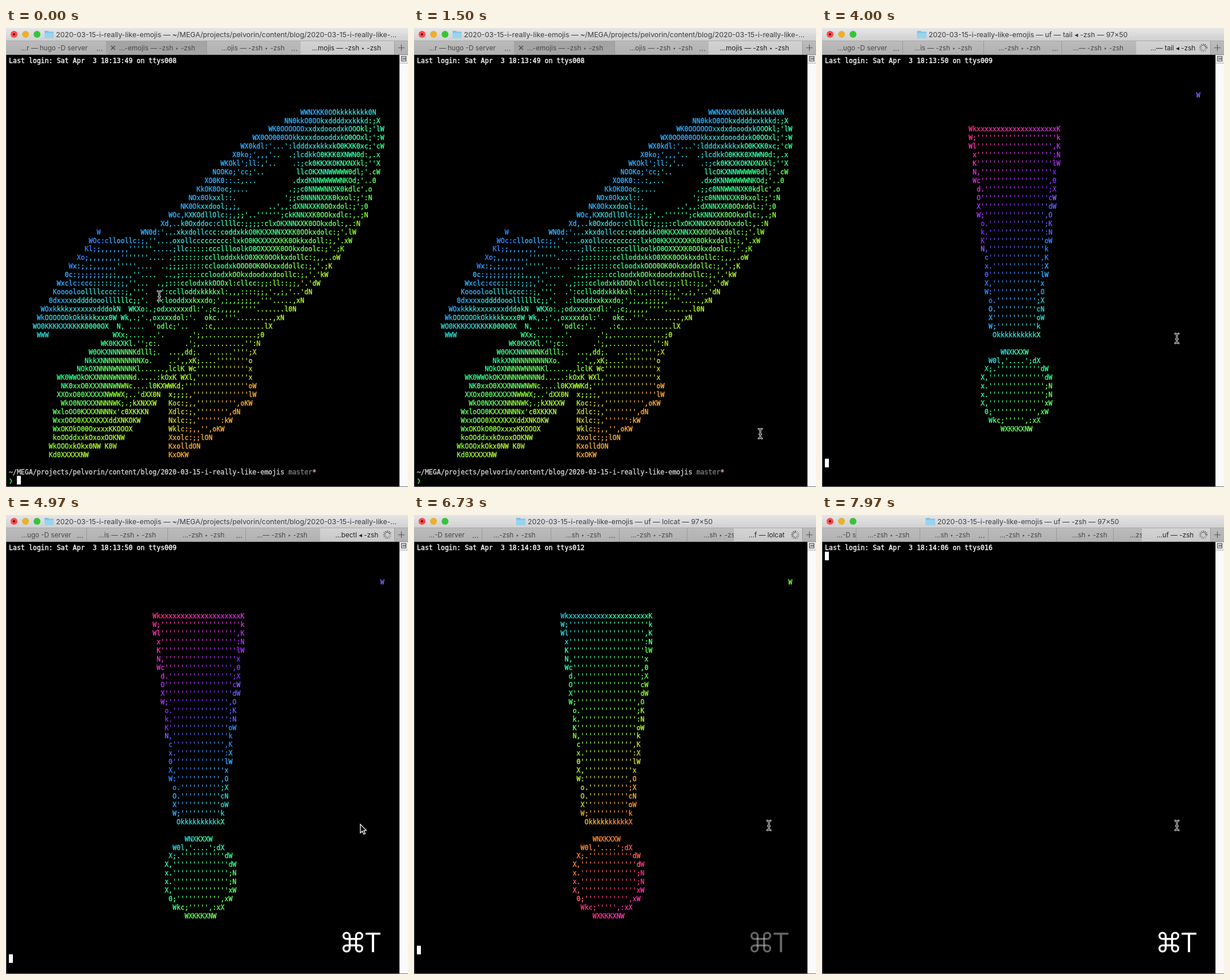
Recreate the animation shown at these times as an HTML page with a canvas. Size 700 by 800 pixels, loop 8000 ms.

```html
<!DOCTYPE html>
<html lang="en">
<head>
<meta charset="utf-8">
<title>Terminal tabs</title>
<style>
html, body { margin: 0; width: 100%; height: 100%; overflow: hidden; background: #000; }
canvas { display: block; }
</style>
</head>
<body>
<canvas id="stage" width="700" height="800"></canvas>
<script>
const LOOP = 8000, COL = 6.953, ROW = 14.93;
const MONO = '11.55px "DejaVu Sans Mono", monospace';
const UI = 'Inter, "DejaVu Sans", sans-serif';
const ctx = document.getElementById('stage').getContext('2d');

// Each art line: start column, then text; c{n} repeats c n times.
const WING = `





73 WWNXKK0OOkkkkkkkk0N
69 NN0kkO0OOkxddddxxkkkd:;X
65 WK0OOOOOOxxdxdooodxkOOOkl;'lW
61 WX0OO000OOkkxxxdoooddxkO0OOxl;':W
58 WX0kdl:'...':ldddxxkkkxkO0KXK0xc;'cW
56 X0ko;',,,'..  .;lcdkkO0KKK0XNWN0d:,.x
53 WKOkl';ll:,'..    .:;ck0KKXKOKNXNXkl;''X
51 NOOKo;'cc;'..        llcOKXNNWWWWW0dl;'.cW
49 XO0K0::.:,...         .dxdKNNWWWWWNKOd;'..0
47 KkOK0Ooc;....          .;;c0NNWWNNXK0kdlc'.o
45 NOx0Okxxl::.            ';;c0NNNNXXK0kxol:;':N
43 NK0Okxxdool;,;,       ..',,:dXNNXXK0OOxdol:;';0
40 WOc,KXKOdllOlc:;,;;'..'''''';ckKNNXXK0OOkxdlc:,.;N
38 Xd,..k0Oxddoc:cllllc:;;;;:clxOKXNNXXK0OOkxdol:,.:N
22 W          WN0d:'...xkxdollccc:coddxkkO0KKXXNNXXKK0OOkxdolc:;'.lW
20 WOc:clloollc:;,''....oxollccccccccc:lxkO0KKXXXXXKK0Okkxdoll:;,'.xW
19 Kl;;,,,,,,,''''''.....;llc:::::cccllloolkO0OXXXXK0OOkxdoolc:;'.;K
17 Xo;,,,,,,,,'''''''.... .;:::::::cclloddxkkO0XKK0OOkkxdollc:;,,..oW
15 Wx:;,;,,,,,,'''''....  ..;;;;:::::ccloodxkOOO0OK0Okxxddollc:;,'.;K
14 0c:;;;;;;;;;;,,,,''....  ..,;:::::ccloodxkOOkxdoodxxdoollc:;,'.'kW
12 Wxclc:ccc:::::;;;,''...  .,;:::cclodxkkOOOxl:cllcc:;;:ll::;;,'.'dW
11 Kooooloollllcccc::;,'''.  .':cclloddxkkkkxl:,,,::::;;,'.,;,'..'dN
10 0dxxxxoddddooollllllc;;'.  .:looddxxkxxdo;',;,,;;;;,,'''.....,xN
8 WOxkkkkxxxxxxxdddokN  WKXo:.;odxxxxxxdl:'.;c;,,,,,''''.......l0N
7 WkOOOOOOkOkkkkkxxx0W Wk,.;'.,oxxxxdol:'.  okc..'''.........,xN
6 WO0KKKKXXKKKK0000OX  N, ....  'odlc;'..   .:c,.{12}lX
7 WWW {16}WXx;.... ..'.      .';,.{13};0
23 WK0KKXKl.'';c:.      .';,.{11}'':N
20 W0OKXNNNNNNKdlll;.  ...,dd;.  ......'''';X
19 NkkXN{10}Xo.    ..',,xK;....''''''''o
17 NOkOXNNNNWNNNNKl......,lclK Wc'{13}x
12 WK0WWOkOKXNNNNWNNNNd.....:kOxK WXl,'{13}x
13 NK0xxO0XXXNNNWNWNc....l0KXWWKd;'{16}oW
12 XXOxO00XXXXXNWWWX;..'dXX0N  x;;;;,'{14}lW
13 WkO0NXKXXNNNNWK;.;kXNXXW   Koc:;,,'{10},oKW
11 WxloOO0KXXXNNNNx'c0XKKKN     Xdlc:;,'''''''',dN
11 WxxOOO0XXXXKXXddXNKOKW       Nxlc:;,'''''':kW
11 WxOKOkO00OxxxxKKOOOX         Wklc:;,,'',oKW
11 koOOddxxkOxoxOOKNW           Xxolc:;;lON
10 WkOOOxkOkx0NW K0W {13}KxolldON
10 Kd0XXXXXNW {20}KxOKW`;

const BANG = `



93 W



36 Wkx{20}K
36 W;'{20}k
36 Wl'{19},K
37 x'{19}:N
37 K'{19}lW
37 N,'{18}x
37 Wc'{17},0
38 d.'{16};X
38 O'{17}cW
38 X'{17}dW
38 W;'{15},O
39 o.'{14};K
39 k.'{14}:N
39 K'{15}oW
39 N,'{14}k
40 c'{13},K
40 x.'{12}:X
40 0'{13}lW
40 X,'{12}x
40 W:'{11},O
41 o.'{10};X
41 O.'{10}cN
41 X'{11}oW
41 W;'{10}k
42 Ok{10}X

44 WNXKXXW
41 W0l,'....';dX
40 X;.'{11}dW
39 X,'{14}dW
39 x.'{14};N
39 x.'{14};N
39 X,'{14}xW
40 0;'{11},xW
41 Wkc;''''',:xX
44 WXKKKXNW`;

// Sine rainbow reduced to the six levels per channel of a 256-colour terminal.
function rainbow(step, phase) {
  const a = step * 0.1 + phase * Math.PI / 180;
  const rgb = [0, 1, 2].map(k => {
    const level = Math.floor(6 * (128 + 127 * Math.sin(a + k * Math.PI * 2 / 3)) / 256);
    return level ? 55 + 40 * level : 48;
  });
  return `rgb(${rgb})`;
}
const cellX = col => 5 + col * COL;
const baseline = row => 61 + row * ROW;

// Terminal text with a hairline outline for the heavier screen rendering.
function typeAt(g, text, col, row, color) {
  g.font = MONO;
  g.textAlign = 'left';
  g.lineWidth = 0.35;
  g.fillStyle = g.strokeStyle = color;
  g.fillText(text, cellX(col), baseline(row));
  g.strokeText(text, cellX(col), baseline(row));
}

// Paint an art once, with diagonal rainbow colours, on its own layer.
function paintArt(art, phase) {
  const layer = document.createElement('canvas');
  layer.width = 700; layer.height = 800;
  const g = layer.getContext('2d');
  art.split('\n').forEach((line, row) => {
    if (!line) return;
    const gap = line.indexOf(' '), start = +line.slice(0, gap);
    const text = line.slice(gap + 1).replace(/(.)\{(\d+)\}/g, (_, c, n) => c.repeat(+n));
    [...text].forEach((c, i) => {
      typeAt(g, c, start + i, row, rainbow(row + (start + i) / 3, phase));
    });
  });
  return layer;
}

const arts = [paintArt(WING, 72), paintArt(BANG, -2), paintArt(BANG, 145)];
const FOLDER = '2020-03-15-i-really-like-emojis';
const PATH = '~/MEGA/projects/pelvorin/content/blog/' + FOLDER;
const TITLES = {
  path: PATH.slice(0, -6) + '…',
  zsh: 'uf — -zsh — 97×50',
  wget: "uf — wget --quiet https://xn--i-7iq.ws/emoji-image/-'-W.png?form…",
  lolcat: 'uf — lolcat — 97×50',
  tail: 'uf — tail ◂ -zsh — 97×50'
};

// Tab: right edge, label centre, label. The last one is active.
const LONG = '…-zsh ‣ -zsh', SHORT = '…sh ‣ -zsh';
const TABS = [
  { dots: [163, 502], tabs: [[174, 84, '…r — hugo -D server'], [349, 263, '…-emojis — -zsh ‣ -zsh'],
    [513, 430, '…ojis — -zsh ‣ -zsh'], [676, 593]] },
  { dots: [129, 406], tabs: [[140, 70, '…ugo -D server'], [281, 211, '…is — -zsh ‣ -zsh'],
    [417, 344, LONG], [547, 481, '…— -zsh ‣ -zsh'], [676, 611]] },
  { dots: [107, 345], tabs: [[118, 57, '…-D server'], [238, 175, LONG], [357, 295, SHORT],
    [475, 414, LONG], [557, 535, SHORT], [676, 614]] },
  { dots: [278], tabs: [[59, 57, '…-D server'], [170, 116, LONG], [289, 227, SHORT],
    [408, 346, LONG], [507, 466, SHORT], [557, 570, '…zsh ‣ -zsh'], [676, 615]] }
];

// start time, tab set, title, active label
const STEPS = [
  [0, 0, 'path', '…mojis — -zsh ‣ -zsh'],
  [2300, 1, 'zsh', '…uf — -zsh'],
  [2500, 1, 'wget', "…-O -'-W.png"],
  [3480, 1, 'lolcat', '…f — lolcat'],
  [3800, 1, 'tail', '…— tail ◂ -zsh'],
  [4600, 1, 'path', '…bectl ◂ -zsh'],
  [5200, 2, 'zsh', '…uf — -zsh'],
  [5450, 2, 'wget', "…-O -'-W.png"],
  [6400, 2, 'lolcat', '…f — lolcat'],
  [6930, 2, 'tail', '…— tail ◂ -zsh'],
  [7750, 3, 'zsh', '…uf — -zsh']
];
const LOGINS = ['18:13:49 on ttys008', '18:13:50 on ttys009', '18:14:03 on ttys012', '18:14:06 on ttys016'];
const ART_START = [-999, 3520, 6450, Infinity];
const PRESSES = [2000, 4900, 7680];

const clamp = v => Math.max(0, Math.min(1, v));
const ease = v => v * v * (3 - 2 * v);

function rect(x, y, w, h, color) {
  ctx.fillStyle = color;
  ctx.fillRect(x, y, w, h);
}
function shade(x, y, w, h, top, bottom) {
  const g = ctx.createLinearGradient(0, y, 0, y + h);
  g.addColorStop(0, top);
  g.addColorStop(1, bottom);
  rect(x, y, w, h, g);
}
function label(text, x, y, font, color, align = 'left') {
  ctx.font = font;
  ctx.fillStyle = color;
  ctx.textAlign = align;
  ctx.fillText(text, x, y);
}
function strokeLines(lines, width, color) {
  ctx.lineWidth = width;
  ctx.strokeStyle = color;
  ctx.beginPath();
  for (const [x1, y1, x2, y2] of lines) { ctx.moveTo(x1, y1); ctx.lineTo(x2, y2); }
  ctx.stroke();
}
const mono = (text, col, row, color) => typeAt(ctx, text, col, row, color);

function titleBar(title) {
  shade(0, 0, 700, 23, '#e7e6e7', '#d0cfd0');
  ['#ff4b4c', '#e9b12c', '#37c43c'].forEach((color, i) => {
    ctx.fillStyle = color;
    ctx.beginPath();
    ctx.arc(14 + i * 20, 11, 6, 0, 7);
    ctx.fill();
  });
  ctx.fillStyle = '#5c0808';
  ctx.beginPath();
  ctx.arc(14, 11, 2, 0, 7);
  ctx.fill();

  const text = FOLDER + ' — ' + TITLES[title];
  ctx.font = '12.3px ' + UI;
  const x = Math.max(67, 349 - (ctx.measureText(text).width + 20) / 2);
  rect(x, 5, 7, 4, '#7cc3e4');
  rect(x, 6.5, 16, 11.5, '#7cc3e4');
  rect(x, 8.5, 16, 9.5, '#98d4ef');
  label(text, x + 20, 15.5, '12.3px ' + UI, '#3c3c3c');
}

function tabBar(set, active, t) {
  const { tabs, dots } = TABS[set];
  shade(0, 23, 700, 24, '#bcbbbc', '#b2b1b2');
  rect(0, 22, 700, 1, '#a9a8a9');
  let left = 0;
  tabs.forEach(([right, centre, text], i) => {
    const current = i === tabs.length - 1;
    if (current) shade(left, 23, right - left, 24, '#d4d3d4', '#cac9ca');
    if (set === 0 && i === 1) rect(left, 23, right - left, 24, '#a5a4a5');
    ctx.save();
    ctx.beginPath();
    ctx.rect(left, 22, right - left, 25);
    ctx.clip();
    label(text || active, centre, 38.5, '11.7px ' + UI, current ? '#222' : '#484848', 'center');
    ctx.restore();
    rect(right, 23, 1, 24, '#9b9a9b');
    left = right;
  });
  for (const x of dots) label('...', x, 40, '600 12px ' + UI, '#555', 'center');
  if (set === 0) strokeLines([[183, 31, 190, 38], [190, 31, 183, 38]], 1.2, '#444');
  else spinner(t);
  strokeLines([[683, 34.5, 694, 34.5], [688.5, 29, 688.5, 40]], 1.1, '#555');
  rect(0, 46, 700, 1, '#8e8d8e');
}

function spinner(t) {
  const head = Math.floor(t / 83);
  for (let i = 0; i < 12; i++) {
    const a = i * Math.PI / 6, c = Math.cos(a), s = Math.sin(a);
    const age = ((head - i) % 12 + 12) % 12;
    strokeLines([[664 + 3.5 * c, 34.5 + 3.5 * s, 664 + 7.5 * c, 34.5 + 7.5 * s]], 1.3,
      `rgba(50,50,50,${0.9 - age * 0.055})`);
  }
}

function scrollBar() {
  rect(685, 47, 15, 753, '#fafafa');
  rect(685, 47, 1, 753, '#d8d8d8');
  rect(686, 47, 14, 14, '#e8e8e8');
  ctx.lineWidth = 1;
  ctx.strokeStyle = '#444';
  ctx.strokeRect(688.5, 49.5, 8, 8);
  strokeLines([[690, 52.5, 696, 52.5], [690, 54.5, 696, 54.5]], 1, '#444');
  rect(685, 61, 15, 1, '#bbb');
}

const block = (col, row) => rect(cellX(col), 49 + row * ROW, 7, 15, '#fff');

function terminal(set, t) {
  rect(0, 47, 700, 753, '#000');
  mono('Last login: Sat Apr  3 ' + LOGINS[set], 0, 0, '#fff');
  const shown = clamp((t - ART_START[set]) / 180);
  if (shown > 0) {
    const h = Math.round(50 + 47 * ROW * shown);
    ctx.drawImage(arts[set], 0, 0, 700, h, 0, 0, 700, h);
  }
  if (set === 0) {
    mono(PATH, 0, 48, '#d0d0d0');
    mono('master', 70, 48, '#7c7c7c');
    mono('*', 76, 48, '#f0a0b4');
    mono('❯', 0, 49, '#4fc43f');
    if (t % 1000 < 480) block(2, 49);
  } else {
    block(0, shown === 0 ? 1 : set === 1 && t >= 4600 ? 48 : Math.round(47 * shown));
  }
}

function keyHint(t) {
  const since = t - PRESSES.findLast(p => p <= t);
  const alpha = since >= 0 ? 1 - clamp((since - 1650) / 300) : 0;
  if (!alpha) return;
  ctx.save();
  ctx.globalAlpha = alpha;
  ctx.translate(604, 744.5);
  ctx.lineWidth = 3.4;
  ctx.strokeStyle = '#fff';
  ctx.strokeRect(-5.6, -5.6, 11.2, 11.2);
  for (let i = 0; i < 4; i++) {
    ctx.beginPath();
    ctx.moveTo(5.6, 5.6);
    ctx.lineTo(5.6, 11);
    ctx.arc(11, 11, 5.4, Math.PI, -Math.PI / 2, true);
    ctx.lineTo(5.6, 5.6);
    ctx.stroke();
    ctx.rotate(Math.PI / 2);
  }
  label('T', 35, 17.5, '48px "Open Sans", "Noto Sans", sans-serif', '#fff', 'center');
  ctx.restore();
}

function pointer(t) {
  const a = ease(clamp((t - 150) / 800)), b = ease(clamp((t - 2900) / 800));
  const x = 267 + 336 * a + 15 * b, y = 467 + 240 * a - 166 * b;
  ctx.save();
  ctx.translate(x, y);
  if (t >= 4750 && t < 5250) {
    ctx.beginPath();
    [[-1, -2], [-1, 13], [2.5, 10], [5, 15.5], [7.5, 14.3], [5, 9], [9.5, 8.6]]
      .forEach(p => ctx.lineTo(...p));
    ctx.closePath();
    ctx.fillStyle = '#111';
    ctx.fill();
    ctx.lineWidth = 1.3;
    ctx.strokeStyle = '#fff';
    ctx.stroke();
  } else {
    const beam = [[0, -7, 0, 7], [0, -7, -3, -8.3], [0, -7, 3, -8.3], [0, 7, -3, 8.3], [0, 7, 3, 8.3], [-1.5, 1, 1.5, 1]];
    ctx.lineCap = 'round';
    strokeLines(beam, 3, '#eee');
    strokeLines(beam, 1.1, '#111');
  }
  ctx.restore();
}

function windowEdge() {
  rect(0, 47, 1, 753, '#555');
  rect(0, 799, 700, 1, '#777');
}

function draw(now) {
  const t = now % LOOP;
  const [, set, title, active] = STEPS.findLast(s => s[0] <= t);
  terminal(set, t);
  scrollBar();
  titleBar(title);
  tabBar(set, active, t);
  windowEdge();
  keyHint(t);
  pointer(t);
}

const began = performance.now();
function tick() {
  draw(performance.now() - began);
  requestAnimationFrame(tick);
}
tick();
</script>
</body>
</html>
```
